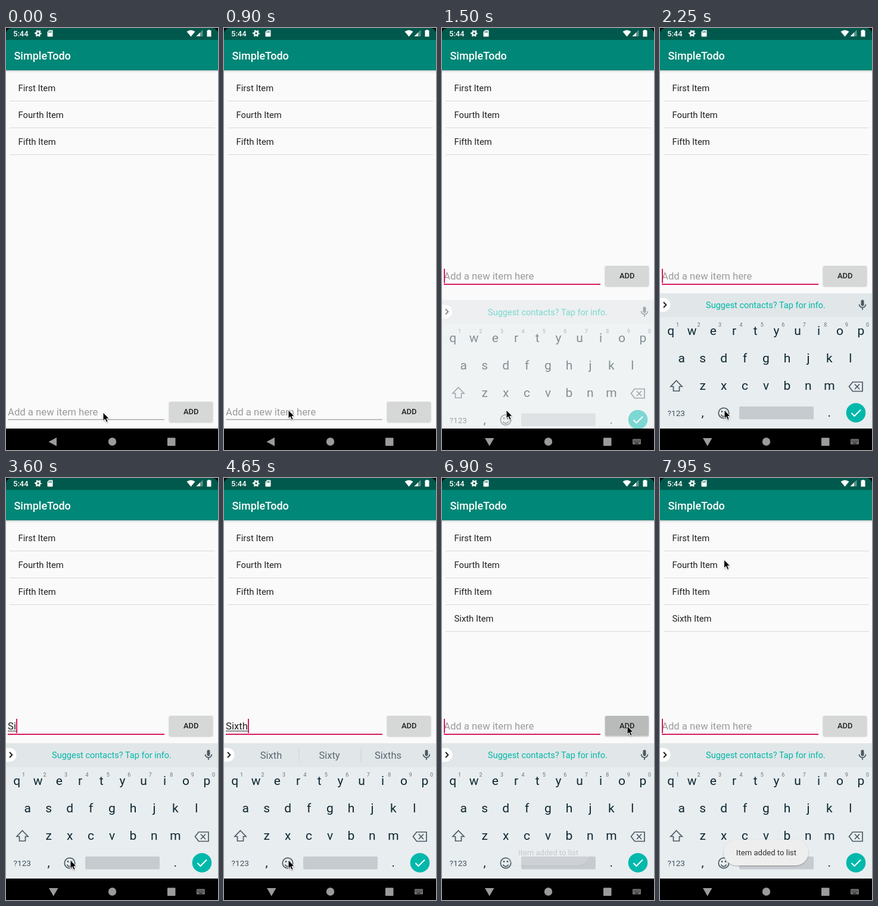
Write an HTML page that moves like this. It is 356 by 708 pixels and loops after 8000 ms.

```html
<!DOCTYPE html>
<html lang="en">
<head>
<meta charset="utf-8">
<title>SimpleTodo</title>
<style>
html, body { margin: 0; width: 100%; height: 100%; overflow: hidden; background: #fafafa; }
svg { display: block; width: 356px; height: 708px; font-family: Roboto, sans-serif; }
text { white-space: pre; }
.mid { text-anchor: middle; }
.item { font-size: 14.8px; fill: #212121; }
.field { font-size: 16.7px; }
.key { font-size: 21px; fill: #0d2730; }
.digit { font-size: 9px; fill: #66747c; }
.word { font-size: 16.5px; fill: #5b6971; }
.line { fill: none; stroke: #4a5a62; stroke-width: 1.7; }
</style>
</head>
<body>
<svg viewBox="0 0 356 708">
  <defs>
    <linearGradient id="shade" x2="0" y2="1">
      <stop stop-opacity=".16"/><stop offset="1" stop-opacity="0"/>
    </linearGradient>
    <filter id="soft" x="-20%" y="-30%" width="140%" height="180%">
      <feDropShadow dx="0" dy="1" stdDeviation="1" flood-opacity=".3"/>
    </filter>
    <clipPath id="btnClip"><rect x="274" y="627" width="73" height="33.5" rx="2"/></clipPath>
  </defs>
  <rect width="356" height="708" fill="#fafafa"/>

  <!-- status bar and toolbar -->
  <rect width="356" height="20" fill="#00594c"/>
  <rect y="20" width="356" height="51" fill="#008777"/>
  <rect y="71" width="356" height="4" fill="url(#shade)"/>
  <path d="M0 0H9A9 9 0 0 0 0 9ZM356 0H347A9 9 0 0 1 356 9Z"/>
  <g fill="#fff">
    <text x="12" y="14" font-size="13" font-weight="500">5:44</text>
    <circle cx="54" cy="9" r="3.1" fill="none" stroke="#fff" stroke-width="2.6"/>
    <circle cx="54" cy="9" r="5" fill="none" stroke="#fff" stroke-width="1.8" stroke-dasharray="2.4 2.836" stroke-dashoffset="1.2"/>
    <path d="M72.5 3.5H77.5Q78.5 3.5 78.5 4.5V13.5Q78.5 14.5 77.5 14.5H70.5Q69.5 14.5 69.5 13.5V6.5Z"/>
    <path d="M72 5.8V8M74 5V8M76 5V8" stroke="#00594c"/>
    <path d="M303.5 6Q310.5 .8 317.5 6L310.5 14.5Z"/>
    <path d="M330.5 3V14H319.5Z" opacity=".35"/>
    <path d="M326 7.5V14H319.5Z"/>
    <path d="M339.5 4H337.5V14.5H344.5V4H342.5V3H339.5Z"/>
    <text x="13.5" y="53" font-size="18" font-weight="500">SimpleTodo</text>
  </g>

  <g id="list"></g>

  <!-- entry row -->
  <g id="entry">
    <rect id="rule" x="3" width="263"/>
    <text id="field" class="field" x="3" y="650"></text>
    <rect id="compose" y="652" height="1" fill="#333"/>
    <rect id="caret" y="632" width="2" height="24" fill="#d81b60"/>
    <rect id="btn" x="274" y="627" width="73" height="33.5" rx="2" filter="url(#soft)"/>
    <circle id="ripple" cx="311" cy="644" r="22" fill="#b8bbba" clip-path="url(#btnClip)"/>
    <text class="mid" x="310.7" y="648" font-size="13" font-weight="500" fill="#212121">ADD</text>
  </g>

  <!-- keyboard -->
  <g id="board">
    <rect y="445" width="356" height="227" fill="#e8edf0"/>
    <rect y="445" width="356" height="40" fill="#e1e6e9"/>
    <path d="M0 453H6A11.5 11.5 0 0 1 6 476H0Z" fill="#fff"/>
    <path d="M6 460L10.3 464.5L6 469" class="line" style="stroke:#222;stroke-width:2"/>
    <text id="info" class="mid" x="177.5" y="470" font-size="14.5" fill="#00b8a6">Suggest contacts? Tap for info.</text>
    <g id="words">
      <path d="M126 454V476M230 454V476" stroke="#cbd1d5"/>
      <text class="word mid" x="79" y="471"></text>
      <text class="word mid" x="177" y="471"></text>
      <text class="word mid" x="275.5" y="471"></text>
    </g>
    <rect x="337.5" y="456" width="5" height="10.5" rx="2.5" fill="#4a5a62"/>
    <path d="M334.5 463.5A5.5 5.5 0 0 0 345.5 463.5M340 469V473" class="line"/>
    <g id="keys"></g>
    <path d="M27.5 591.5L37 601.5H32.5V609H22.5V601.5H18Z" class="line"/>
    <path d="M317.5 601.5L323.5 594H340V609.5H323.5ZM327 597.5L335 606M335 597.5L327 606" class="line"/>
    <text class="mid" x="27.3" y="651" font-size="13.6" fill="#40525a">?123</text>
    <circle cx="107" cy="646" r="8.7" class="line"/>
    <circle cx="104" cy="643.5" r="1.4" fill="#4a5a62"/><circle cx="110" cy="643.5" r="1.4" fill="#4a5a62"/>
    <path d="M102.5 648.5A4.8 4.8 0 0 0 111.5 648.5" class="line"/>
    <rect x="133" y="635" width="125" height="21.5" rx="2" fill="#c6cbd0"/>
    <circle cx="329" cy="645.5" r="16.3" fill="#00b8ab"/>
    <path d="M321.5 646L326.5 651L337 640.5" class="line" style="stroke:#fff;stroke-width:2"/>
  </g>

  <g id="toast">
    <rect x="107" y="607" width="142" height="43" rx="21.5" fill="#eee" filter="url(#soft)"/>
    <text class="mid" x="178.5" y="633" font-size="13.1" fill="#333">Item added to list</text>
  </g>

  <!-- navigation bar -->
  <rect y="672" width="356" height="36"/>
  <g fill="#9b9b9b">
    <path id="back"/>
    <circle cx="178.5" cy="694" r="6.7"/>
    <rect x="271" y="687.5" width="13.5" height="13.5" rx="1"/>
    <g id="imeIcon">
      <rect x="320" y="689.5" width="14" height="9" rx="1" fill="#777"/>
      <path d="M321.5 692H333M321.5 694.3H333" stroke="#000" stroke-width="1.2" stroke-dasharray="1.2 1.2"/>
      <path d="M324 696.8H330" stroke="#000"/>
    </g>
  </g>

  <path id="mouse" d="M0 0V14.2L3.3 11.2L5.6 16.6L8.2 15.5L5.9 10.3H10.2Z" stroke="#fff" stroke-width="1" filter="url(#soft)"/>
</svg>
<script>
const $ = id => document.getElementById(id);
const STEP = 150, LOOP = 8000;

$('list').innerHTML = ['First', 'Fourth', 'Fifth', 'Sixth'].map((name, i) =>
  `<g><text class="item" x="20.5" y="${106 + 45 * i}">${name} Item</text>
   <rect x="6" y="${122 + 45 * i}" width="345" height="1" fill="#d9d9d9"/></g>`).join('');

const key = (c, x, y, cls = 'key') => `<text class="${cls} mid" x="${x}" y="${y}">${c}</text>`;
$('keys').innerHTML = [['qwertyuiop', 18.3], ['asdfghjkl', 36.2], [' zxcvbnm', 36.2], [' ,     .', 36.2]]
  .map(([row, x0], r) => [...row].map((c, i) =>
    key(c, x0 + 35.45 * i, 515 + 46 * r - (r == 3 ? 1 : 0)) +
    (r ? '' : key((i + 1) % 10, x0 + 11.3 + 35.45 * i, 500.5, 'digit'))).join('')).join('');

// time, text, start of the word being composed, suggestions
const typing = [
  [0, '', 0, ''],
  [3450, 'S', 0, ''],
  [3600, 'Si', 0, ''],
  [4350, 'Six', 0, 'Six Sixth Sir'],
  [4650, 'Sixth', 0, 'Sixth Sixty Sixths'],
  [4800, 'Sixth ', 6, 'sense grade form'],
  [5100, 'Sixth I', 6, 'I It In'],
  [5400, 'Sixth It', 6, 'It Item Its'],
  [5550, 'Sixth Ite', 6, 'Ite Item Items'],
  [5700, 'Sixth Item', 6, 'Item Items Itemized'],
  [6600, '', 0, '']
];
const caretOn = [[1050, 1800], [2250, 2850], [3300, 6300], [6600, 7200], [7650, LOOP]];
const path = [[300, 163, 645], [900, 108, 641], [5850, 108, 641], [6150, 311, 416],
  [6900, 311, 416], [7500, 108, 166], [7950, 107.5, 137]];

const pen = document.createElement('canvas').getContext('2d');
const width = s => { pen.font = '16.7px Roboto, sans-serif'; return pen.measureText(s).width; };
const ramp = (t, a, b) => Math.min(1, Math.max(0, (t - a) / (b - a)));
const set = (id, attrs) => { for (const k in attrs) $(id).setAttribute(k, attrs[k]); };
const show = (el, on) => { el.style.display = on ? '' : 'none'; };

function mouseAt(t) {
  const i = Math.max(1, path.findIndex(p => p[0] >= t));
  const [a, x, y] = path[i - 1], [b, x2, y2] = path[i];
  let k = ramp(t, a, b);
  k *= k * (3 - 2 * k);
  return [x + (x2 - x) * k, y + (y2 - y) * k];
}

function draw(t) {
  const focused = t >= 1050, raised = t >= 1350;
  const [, text, start, words] = typing.findLast(s => s[0] <= t);

  show($('list').lastElementChild, t >= 6600);
  set('entry', { transform: `translate(0 ${raised ? -228 : 0})` });
  set('rule', { y: focused ? 657 : 656.5, height: t >= 1200 ? 2 : 1, fill: focused ? '#d81b60' : '#858585' });
  $('field').textContent = text || 'Add a new item here';
  set('field', { fill: text ? '#212121' : '#9b9b9b' });
  const from = width(text.slice(0, start)), end = width(text);
  set('compose', { x: 3 + from, width: end - from });
  set('caret', { x: 3 + Math.round(end) });
  show($('caret'), caretOn.some(([a, b]) => t >= a && t < b));

  const pressed = t >= 6600 && t < 7050;
  set('btn', { fill: pressed ? '#b8bbba' : '#d6d7d7' });
  show($('ripple'), t >= 6300 && t < 6600);

  const up = ramp(t, 1350, 1650);
  set('board', { opacity: up, transform: `translate(0 ${23 * (1 - up)})` });
  show($('info'), !words);
  show($('words'), words);
  const parts = words.split(' ');
  $('words').querySelectorAll('text').forEach((el, i) => el.textContent = parts[i] || '');

  set('toast', { opacity: ramp(t, 6750, 7350) ** 1.2 });
  set('back', { d: raised ? 'M72 688H87.5L79.7 701.5Z' : 'M85 687V701.5L71.5 694.2Z' });
  show($('imeIcon'), raised);
  set('mouse', { transform: `translate(${mouseAt(t)})` });
}

const t0 = performance.now();
function frame() {
  const t = (performance.now() - t0) % LOOP;
  draw(Math.floor(t / STEP) * STEP);
  requestAnimationFrame(frame);
}
frame();
</script>
</body>
</html>
```
